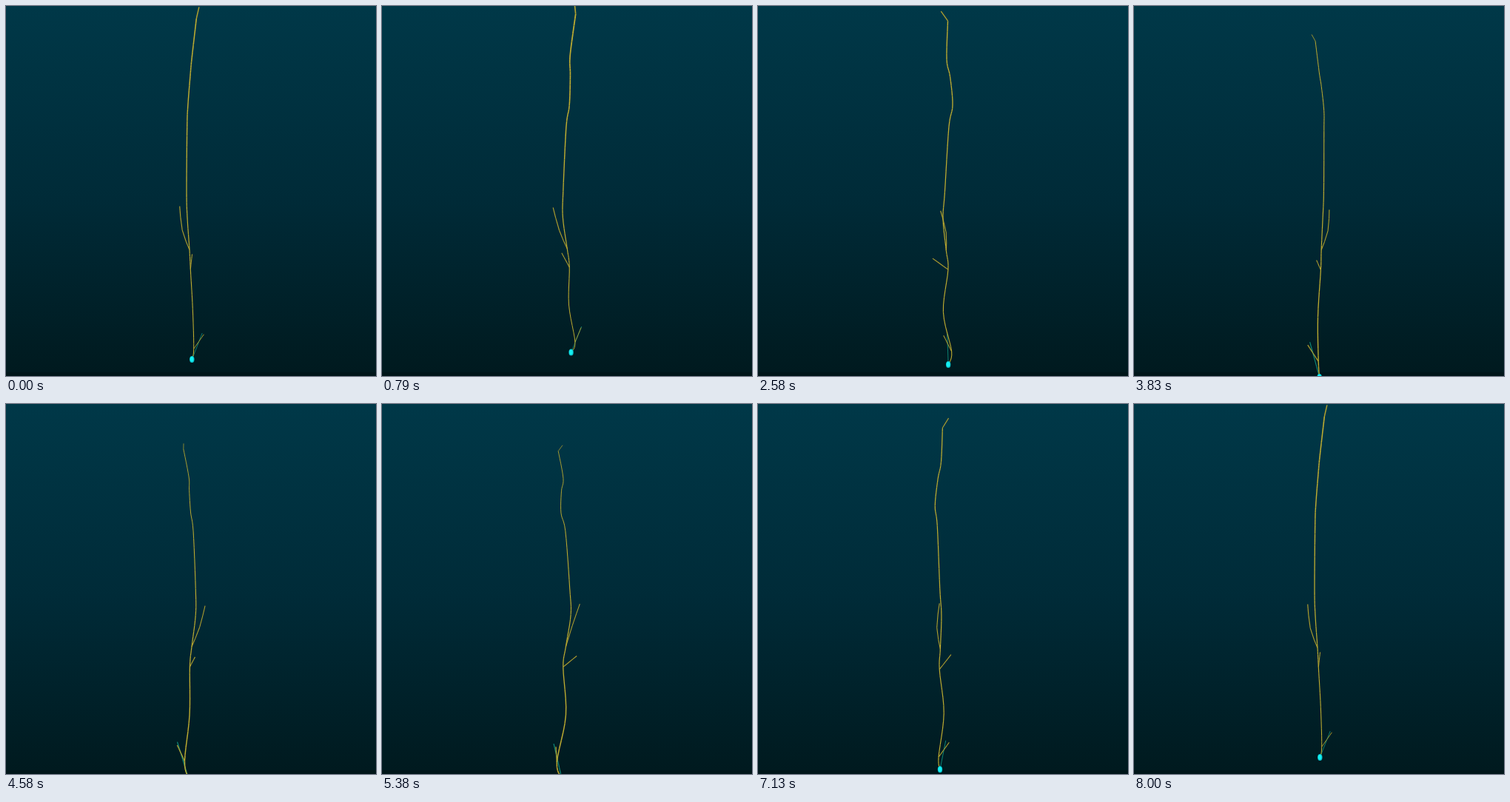
These frames come from a looping animation (500x500 px, 8040 ms). An HTML page with a canvas:

```html
<!DOCTYPE html>
<html lang="en">
<head>
<meta charset="utf-8">
<title>Rotating neuron</title>
<style>
  html, body { margin: 0; width: 100%; height: 100%; overflow: hidden; background: #001a1f; }
  canvas {
    display: block; width: 500px; height: 500px;
    background: linear-gradient(#003848, #002b38 52%, #001a1f 99%, #001519 99%);
  }
</style>
</head>
<body>
<canvas id="stage" width="500" height="500"></canvas>
<script>
const ctx = document.getElementById('stage').getContext('2d');
const LOOP = 8040, FPS = 24, TURN = 192;
const CENTER = 250, LEAN = 46 * Math.PI / 180;
const TILT = 0.000465, PIVOT = 61, FORESHORTEN = 0.04, PITCH = 0.2;

// Vertices are [height, side, depth] around the turning axis.
const topFork = [-218, 7, 10];
const sideFork = [81, -2.3, 3.4];
const spurFork = [108, -1, 6.8];
const baseFork = [226, 3.4, 14];
const soma = [244, 1, 8];

const axon = spline([
  topFork, [-171, 0.9, 5.6], [-149, -1.4, 9.6], [-113, -4.5, 11.9],
  [-85, -5.6, 5.8], [0, -6.3, -0.5], [37, -5.3, -2.7],
  sideFork, spurFork, [168, 2, 1], baseFork, soma
]);
const twigs = [
  [topFork, [-239, 2, 5.3]],
  [topFork, [-230, 10.6, 1.5]],
  [sideFork, [54, -12.1, -1.2], [23, -15.6, -11]],
  [spurFork, [91, 1.2, -15.2]],
  [baseFork, [205, 17.1, 8.2]]
].map(spline);
const greenTwig = spline([soma, [202, 14.9, 12.7]]);

// Catmull-Rom curve through the key vertices.
function spline(keys, steps = 6) {
  const at = i => keys[Math.max(0, Math.min(keys.length - 1, i))];
  const points = [keys[0]];
  for (let i = 0; i < keys.length - 1; i++) {
    for (let n = 1; n <= steps; n++) {
      const u = n / steps;
      points.push(keys[i].map((p, k) => {
        const q = at(i + 1)[k];
        const m = (q - at(i - 1)[k]) / 2, w = (at(i + 2)[k] - p) / 2;
        return p + u * (m + u * (3 * (q - p) - 2 * m - w + u * (2 * (p - q) + m + w)));
      }));
    }
  }
  return points;
}

function project([h, side, deep], turn) {
  const c = Math.cos(turn), s = Math.sin(turn), lean = Math.cos(turn - LEAN);
  const depth = 1 + TILT * (h - PIVOT) * lean;
  return {
    x: CENTER + 0.3 + side * c + deep * s,
    y: CENTER + h * (1 - FORESHORTEN * lean * lean) / depth + PITCH * (deep * c - side * s),
    near: depth ** -3
  };
}

// Nearer pieces are drawn thicker.
function stroke(points, turn, color, width) {
  const path = points.map(p => project(p, turn));
  ctx.strokeStyle = color;
  for (let i = 1; i < path.length; i++) {
    ctx.lineWidth = width * path[i].near;
    ctx.beginPath();
    ctx.moveTo(path[i - 1].x, path[i - 1].y);
    ctx.lineTo(path[i].x, path[i].y);
    ctx.stroke();
  }
}

function oval(x, y, rx, ry, color) {
  ctx.fillStyle = color;
  ctx.beginPath();
  ctx.ellipse(x, y, rx, ry, 0, 0, 2 * Math.PI);
  ctx.fill();
}

function draw(time) {
  const step = Math.floor((time % LOOP) * FPS / 1000);
  const turn = 2 * Math.PI * step / TURN;
  ctx.clearRect(0, 0, 500, 500);
  stroke(greenTwig, turn, '#0d8a7a', 1);
  for (const twig of twigs) stroke(twig, turn, '#b09f2f', 1.1);
  stroke(axon, turn, '#bfac31', 1.2);
  const { x, y } = project(soma, turn);
  oval(x, y, 3.2, 4.5, '#08b9c4');
  oval(x - 0.2, y - 0.2, 2.4, 3.5, '#14f0f2');
}

const start = performance.now();
function tick() {
  draw(performance.now() - start);
  requestAnimationFrame(tick);
}
tick();
</script>
</body>
</html>
```
